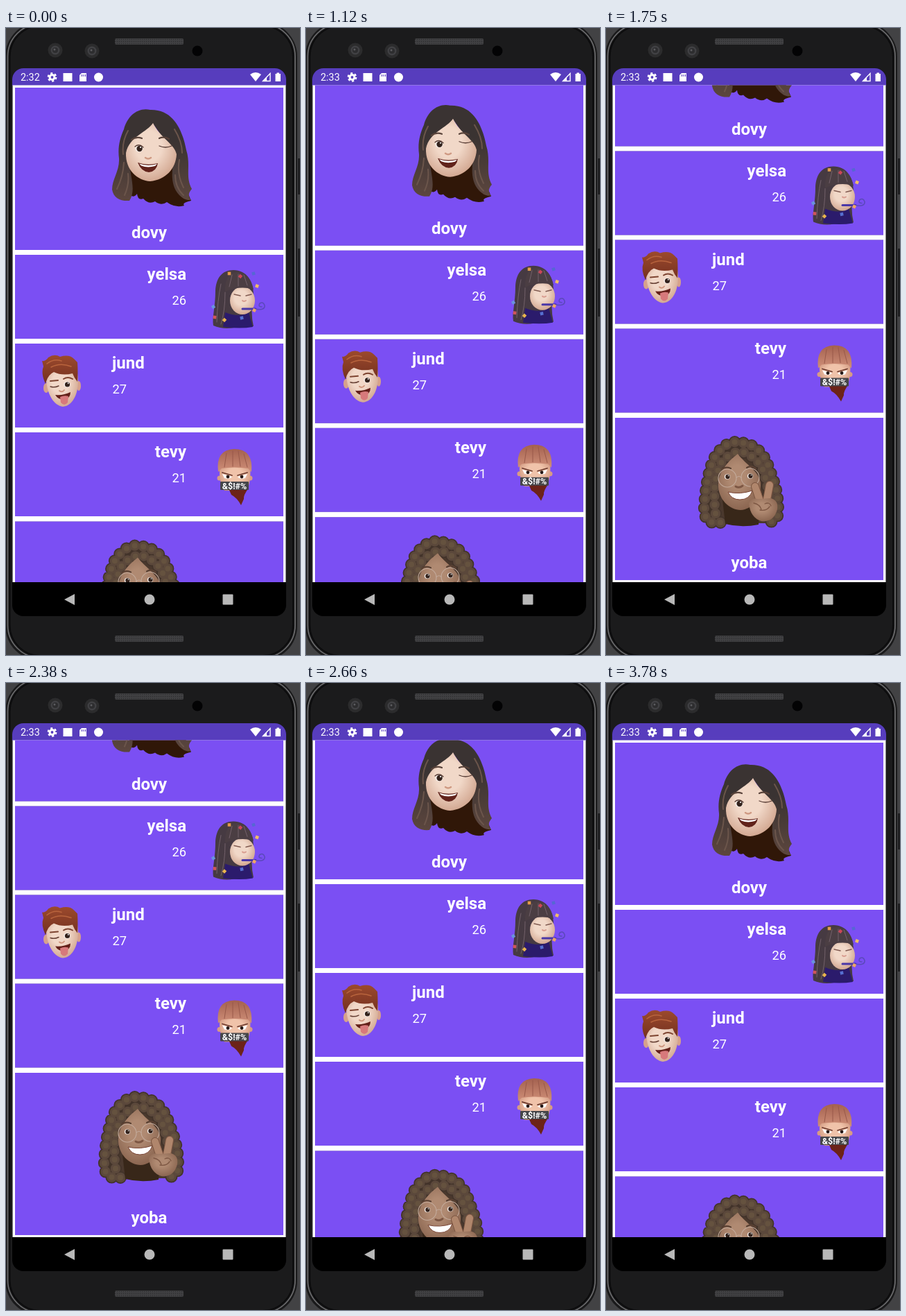
These frames come from a looping animation (424x904 px, 3850 ms). An HTML page:

```html
<!DOCTYPE html>
<html lang="en">
<head>
<meta charset="utf-8">
<title>Avatar list</title>
<style>
  html, body { margin: 0; height: 100%; overflow: hidden; background: #424244; }
  svg { display: block; width: 100vw; height: 100vh; font-family: Roboto, sans-serif; }
  .card { fill: #7b4ff3; filter: drop-shadow(0 .6px .7px #0006); }
  .name { font: bold 24px Roboto, sans-serif; fill: #fff; }
  .age { font-size: 18.3px; fill: #fff; }
  .end { text-anchor: end; }
  .mid { text-anchor: middle; }
  .line { fill: none; stroke-linecap: round; stroke-linejoin: round; }
</style>
</head>
<body>
<svg viewBox="0 0 424 904" preserveAspectRatio="none">
  <defs>
    <clipPath id="screen"><rect x="9" y="58" width="395" height="790" rx="16"/></clipPath>
    <clipPath id="viewport"><rect x="9" y="82.5" width="395" height="716.5"/></clipPath>
    <radialGradient id="pale" cx=".45" cy=".4" r=".65">
      <stop offset=".4" stop-color="#f1d8c8"/><stop offset="1" stop-color="#cfa28b"/>
    </radialGradient>
    <radialGradient id="warm" cx=".5" cy=".4" r=".65">
      <stop offset=".4" stop-color="#f0c3aa"/><stop offset="1" stop-color="#cb9077"/>
    </radialGradient>
    <radialGradient id="tan" cx=".45" cy=".4" r=".65">
      <stop offset=".3" stop-color="#b08a72"/><stop offset="1" stop-color="#87624d"/>
    </radialGradient>
    <linearGradient id="dark" x2="0" y2="1">
      <stop offset=".35" stop-color="#3a3332"/><stop offset="1" stop-color="#5c463e"/>
    </linearGradient>
    <linearGradient id="red" x2="0" y2="1">
      <stop stop-color="#9c4a2d"/><stop offset="1" stop-color="#73301f"/>
    </linearGradient>
    <linearGradient id="copper" x2="0" y2="1">
      <stop stop-color="#a4614f"/><stop offset="1" stop-color="#cf8f78"/>
    </linearGradient>
    <pattern id="mesh" width="3" height="3" patternUnits="userSpaceOnUse">
      <rect width="3" height="3" fill="#414143"/><circle cx="1.5" cy="1.5" r=".8" fill="#2c2c2e"/>
    </pattern>
    <g id="eye"><ellipse rx="5.5" ry="5" fill="#f6efeb"/><circle cx=".6" r="4.2" fill="#33221c"/><circle cx="2" cy="-2" r="1.1" fill="#fff"/></g>
    <g id="lens"><circle r="10.5" fill="#2c2c2d"/><circle r="6.5" fill="#414144"/><circle r="4" fill="#2d2d2f"/><circle cx="-1" cy="-1" r="1.5" fill="#5c5c5f"/></g>
  </defs>

  <!-- phone body -->
  <path d="M422.5 188v52M422.5 318v98" stroke="#1d1d1f" stroke-width="3"/>
  <rect x="-1" y="-9" width="421" height="921" rx="50" fill="#1a1a1b"/>
  <rect x="2.5" y="-6" width="414.5" height="914" rx="47" fill="#1b1b1c" stroke="#6f6f71" stroke-width="1.6"/>
  <rect x="5.5" y="-3" width="408.5" height="908" rx="44" fill="#1b1b1c" stroke="#0c0c0d" stroke-width="2"/>
  <rect x="157" y="15" width="99" height="9" rx="2" fill="url(#mesh)"/>
  <rect x="157" y="876" width="99" height="9" rx="2" fill="url(#mesh)"/>
  <use href="#lens" x="71" y="32"/><use href="#lens" x="124" y="33"/>
  <circle cx="276" cy="33" r="7.5" fill="#030304"/>

  <g clip-path="url(#screen)">
    <rect x="9" y="58" width="395" height="790"/>
    <rect x="9" y="58" width="395" height="25" fill="#573dbd"/>
    <rect x="9.5" y="82.5" width="394" height="716.5" fill="#fff"/>

    <g clip-path="url(#viewport)"><g id="list">
      <rect class="card" x="13" y="86" width="387" height="234"/>
      <rect class="card" x="13" y="327" width="387" height="121"/>
      <rect class="card" x="13" y="455" width="387" height="121"/>
      <rect class="card" x="13" y="583" width="387" height="121"/>
      <rect class="card" x="13" y="711.5" width="387" height="234"/>
      <text class="name mid" x="206.5" y="303">dovy</text>
      <text class="name end" x="260" y="363">yelsa</text><text class="age end" x="260" y="399">26</text>
      <text class="name" x="153" y="491">jund</text><text class="age" x="153.5" y="527">27</text>
      <text class="name end" x="260" y="619">tevy</text><text class="age end" x="260" y="655">21</text>
      <text class="name mid" x="206.5" y="928.5">yoba</text>

      <!-- long dark hair, wink -->
      <g>
        <path fill="#301708" d="M178 200L178 240Q184 246 189 239Q190 249 198 246Q206 255 215 250Q224 257 232 251Q244 260 257 256Q253 252 267 249L244 195Z"/>
        <path fill="url(#dark)" d="M208 118C190 114 175 127 170 146C164 160 161 172 163 188C164 206 153 218 153 233C155 245 165 250 178 249C188 234 179 215 178 192L212 138L243 182C239 205 236 226 250 241Q258 249 267 248Q260 241 268 232C258 214 267 198 260 176C255 150 243 117 208 118Z"/>
        <path class="line" stroke="#6b554b" stroke-width="2" d="M170 194Q169 214 160 232M176 210Q178 226 171 241M250 190Q246 211 256 230M244 212Q244 230 256 241M176 148Q167 164 169 182M243 146Q254 164 254 180"/>
        <path fill="url(#pale)" d="M212 137C204 150 178 156 173 180C172 205 190 220 208 221C230 219 245 203 246 182C243 167 222 158 212 137Z"/>
        <path class="line" stroke="#59433a" stroke-width="2.2" d="M181 161Q188 156 196 159M221 159Q228 156 235 160"/>
        <use href="#eye" x="192" y="174"/>
        <path class="line" stroke="#553a32" stroke-width="1.3" d="M186 171Q192 166 198 172M221 170Q230 174 239 170"/>
        <path class="line" stroke="#cf9a83" stroke-width="2.5" d="M201 187Q205 190 209 187"/>
        <path fill="#61231b" d="M190 194Q204 199 219 195Q217 207 206 208Q195 207 190 194Z"/>
        <path fill="#fff" d="M192 195.5Q204 200 218 196L215 199Q204 202 195 198.5Z"/>
      </g>

      <!-- fringe, party horn, confetti -->
      <g>
        <path fill="#463a42" d="M328 349C311 349 303 361 302 379C302 402 297 417 299 429Q313 435 329 432L357 430Q352 409 357 389C358 365 347 349 328 349Z"/>
        <path fill="#2b1b6c" d="M316 410Q336 418 350 410L356 431Q338 434 313 431Z"/>
        <ellipse cx="341" cy="393" rx="18" ry="20" fill="url(#pale)"/>
        <path fill="#4b3e43" d="M316 380Q315 353 333 352Q352 353 357 377Q338 371 316 380Z"/>
        <path class="line" stroke="#73616a" d="M310 369Q305 392 304 424M316 381Q316 408 310 427M326 356L322 373M335 355V372M343 356L348 371"/>
        <path class="line" stroke="#805a50" stroke-width="1.4" d="M329 384L338 386M346 386L354 384"/>
        <path class="line" stroke="#d99e91" stroke-width="2" d="M341 393Q343 395 346 393"/>
        <path class="line" stroke="#4a37a8" stroke-width="3" d="M341 405L360 405"/>
        <path class="line" stroke="#5b49bb" stroke-width="1.6" d="M357 405Q374 408 373 400Q371 394 366 397Q363 402 369 402"/>
        <g id="confetti"></g>
      </g>

      <!-- red hair, tongue out -->
      <g>
        <ellipse cx="58" cy="519" rx="4" ry="7" fill="#d6a18c"/><ellipse cx="105" cy="516" rx="3" ry="7" fill="#d6a18c"/>
        <path fill="url(#pale)" d="M58 495Q82 482 103 498C107 522 98 545 82 546C66 544 56 521 58 495Z"/>
        <path fill="url(#red)" d="M57 513Q50 498 54 488L52 480Q57 481 61 475Q70 469 78 474Q91 470 98 477L103 482Q104 498 103 510Q98 504 96 498Q81 502 69 496Q60 500 57 513Z"/>
        <path class="line" stroke="#b9643d" stroke-width="1.5" d="M59 484Q69 476 80 480M65 489Q78 482 94 488"/>
        <path class="line" stroke="#7d4430" stroke-width="2" d="M64 509L75 508M83 506Q89 502 96 506"/>
        <use href="#eye" transform="translate(88 514) scale(.85)"/>
        <path class="line" stroke="#674135" stroke-width="1.4" d="M64 517Q70 519 76 516"/>
        <path class="line" stroke="#cf967e" stroke-width="2" d="M77 523Q81 526 84 522"/>
        <path fill="#632019" d="M71 529Q83 530 93 525Q93 534 84 536Q75 536 71 529Z"/>
        <path fill="#d7797b" d="M78 532Q84 529 90 531L89 540Q84 546 79 540Z"/>
      </g>

      <!-- copper fringe, angry -->
      <g>
        <circle cx="308" cy="649" r="3.5" fill="#d79b83"/><circle cx="352" cy="649" r="3.5" fill="#d79b83"/>
        <path fill="url(#warm)" d="M308 630H352Q354 658 346 667H315Q307 658 308 630Z"/>
        <path fill="#6c2318" d="M321 664L350 663Q342 674 343 679L339 688Q333 677 325 673Z"/>
        <path fill="url(#copper)" d="M306 640Q302 608 329 607Q357 607 354 640L349 635Q329 632 311 635Z"/>
        <path class="line" stroke="#98594a" d="M318 613L315 633M327 610V632M335 610L338 632M343 614L348 633"/>
        <path d="M312 643L326 647Q323 651 315 649ZM348 643L334 647Q337 651 345 649Z" fill="#fff"/>
        <circle cx="320" cy="647" r="2.4" fill="#291a17"/><circle cx="340" cy="647" r="2.4" fill="#291a17"/>
        <path class="line" stroke="#6b392c" stroke-width="1.8" d="M312 641L326 645M348 641L334 645"/>
        <rect x="309" y="654" width="41" height="12" rx="1" fill="#46464a"/>
        <text class="mid" x="329.5" y="664.5" font-size="12.5" font-weight="bold" fill="#fff">&amp;$!#%</text>
      </g>

      <!-- curls, glasses, peace sign -->
      <g transform="translate(0 149.5)">
        <path fill="#4a382d" d="M194 600C155 598 140 640 143 695Q147 716 170 714H230Q251 710 248 690C247 645 233 602 194 600Z"/>
        <g class="line" stroke-dasharray="0 12.5">
          <g id="curls"><path d="M165 713Q140 717 142 690Q144 650 155 622Q172 592 196 598Q226 602 236 638Q248 665 248 692Q250 714 230 712"/><path d="M158 700Q152 656 166 627Q184 606 202 613Q226 625 230 650Q237 674 236 700"/></g>
        </g>
        <path fill="#382719" d="M168 680L222 679L220 716Q195 721 172 715Z"/>
        <path fill="url(#tan)" d="M190 614C177 624 163 638 162 657C161 680 179 695 194 695C212 694 224 677 223 656C221 639 202 630 190 614Z"/>
        <path class="line" stroke="#5a4133" stroke-width="2.2" d="M167 636Q173 632 180 635M203 634Q209 630 216 635"/>
        <use href="#eye" transform="translate(175 647) scale(.75)"/><use href="#eye" transform="translate(208 646) scale(.75)"/>
        <g class="line" stroke="#c3aa9b" stroke-width="1.1"><circle cx="175" cy="649" r="13"/><circle cx="208" cy="648" r="13"/><path d="M188 648Q192 645 195 648"/></g>
        <path class="line" stroke="#7d5744" stroke-width="3" d="M187 661Q192 664 197 660"/>
        <path fill="#fff" stroke="#7a4637" d="M176 669Q193 673 211 667Q207 680 193 680Q181 680 176 669Z"/>
        <g class="line" stroke="#7d5743" stroke-width="12"><path d="M223 685L215 661M231 685L236 659"/></g>
        <g class="line" stroke="#b0866c" stroke-width="10"><path d="M223 685L215 661M231 685L236 659"/></g>
        <path fill="url(#tan)" d="M206 685Q208 677 219 679L238 678Q249 681 247 694Q242 713 224 711Q208 706 206 685Z"/>
        <path class="line" stroke="#7d5743" stroke-width="1.3" d="M213 685Q222 687 224 694M229 686Q236 683 238 689M222 695Q231 697 236 690"/>
      </g>
    </g></g>

    <!-- status bar -->
    <text id="clock" x="21" y="76" font-size="14.4" fill="#fff">2:32</text>
    <g fill="#fff">
      <circle cx="66.5" cy="71" r="5.6" fill="none" stroke="#fff" stroke-width="2.6" stroke-dasharray="2.93 2.93"/>
      <circle cx="66.5" cy="71" r="3.4" fill="none" stroke="#fff" stroke-width="3"/>
      <rect x="82.5" y="65" width="13" height="12"/>
      <path d="M109 65H116V77H106V68Z"/>
      <path d="M109.5 67V70M112 67V70M114.5 67V70" stroke="#573dbd"/>
      <circle cx="133.5" cy="71" r="6.5"/>
      <path d="M352 67Q360 61 368 67L360 77Z"/>
      <path d="M370.5 76.5H381V65.5Z" fill="none" stroke="#fff" stroke-width="1.4"/><path d="M370 77L376 71V77Z"/>
      <path d="M388.5 66H390.5V64.5H394V66H396V77H388.5Z"/>
    </g>
    <!-- navigation bar -->
    <g fill="#b8b8b8"><path d="M84 824L99 816V832Z"/><circle cx="207" cy="824" r="7.5"/><rect x="312.5" y="816.5" width="15" height="15" rx="1"/></g>
  </g>
</svg>
<script>
  const LOOP = 3850, STEP = 70, TRAVEL = 149.5;
  const byId = id => document.getElementById(id);
  const list = byId('list'), clock = byId('clock');

  const smooth = (from, to, t) => {
    const p = Math.min(1, Math.max(0, (t - from) / (to - from)));
    return p * p * (3 - 2 * p);
  };

  // Curls: the same dotted path, dark outline first, lighter core on top.
  const strand = byId('curls').innerHTML;
  byId('curls').innerHTML = [['#42332a', 18], ['#5b483b', 14.5], ['#65523f', 8]]
    .map(([color, width]) => `<g stroke="${color}" stroke-width="${width}">${strand}</g>`).join('');

  byId('confetti').innerHTML = [
    [322, 354, '#e29a4b'], [338, 358, '#c94759'], [357, 354, '#5667d3'],
    [362, 372, '#efbd68'], [299, 402, '#6a92dd'], [301, 417, '#cf565b'],
    [315, 421, '#e9b54e'], [340, 418, '#566fd0'], [358, 407, '#eda565']
  ].map(([x, y, color], i) =>
    `<rect x="-2.3" y="-2.3" width="4.6" height="4.6" fill="${color}" transform="translate(${x} ${y}) rotate(${i * 37})"/>`).join('');

  function draw(now) {
    const t = Math.floor(now % LOOP / STEP) * STEP;
    const scroll = TRAVEL * (smooth(1068, 1490, t) - smooth(2410, 2780, t));
    list.setAttribute('transform', `translate(0 ${-scroll})`);
    clock.textContent = t < 560 ? '2:32' : '2:33';
    requestAnimationFrame(draw);
  }
  draw(0);
</script>
</body>
</html>
```
